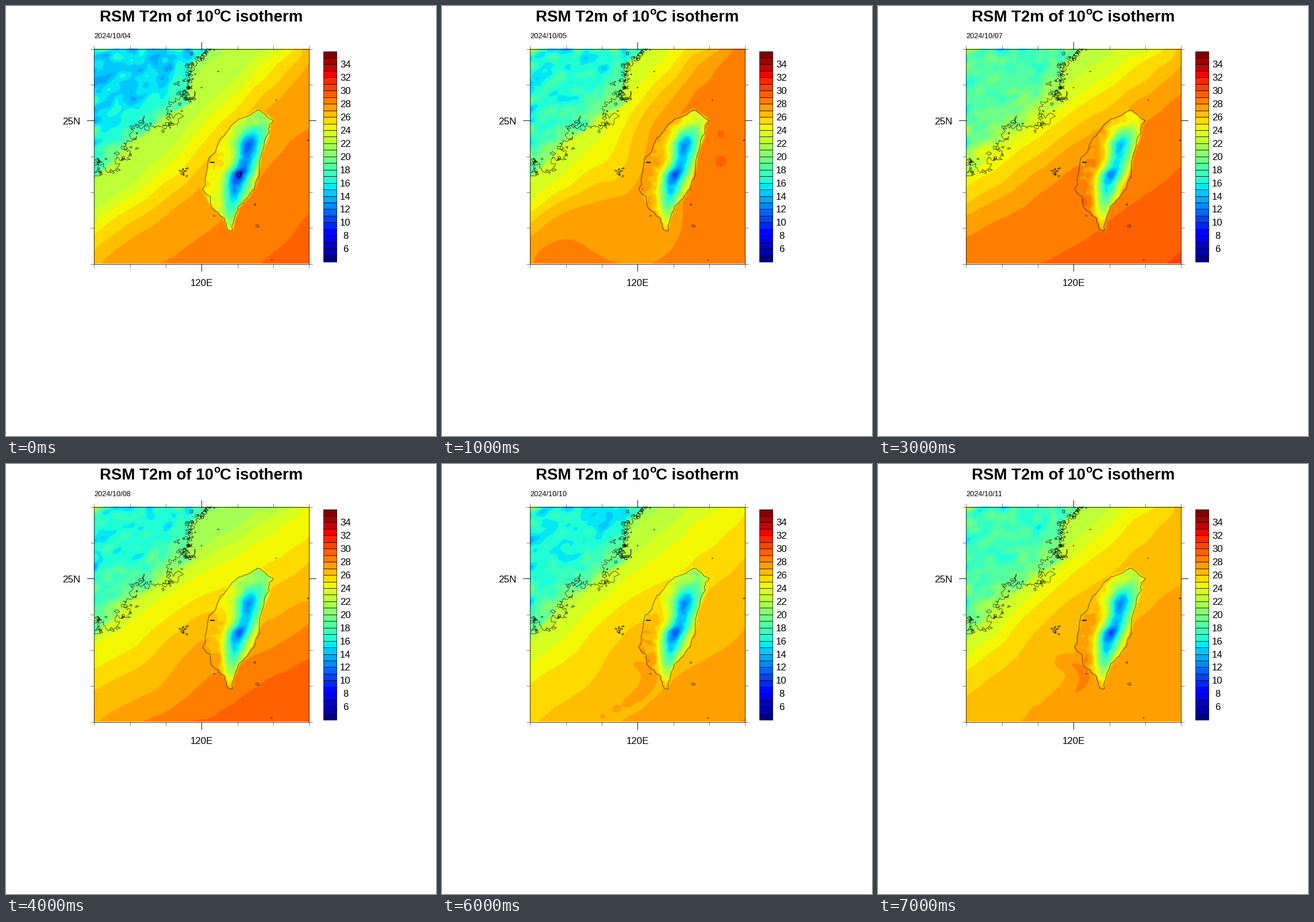
A matplotlib script for the animation above (8 s loop, 748 by 748 pixels).

```python
import numpy as np
import matplotlib.pyplot as plt
from matplotlib.animation import FuncAnimation
from matplotlib.path import Path
from matplotlib.patches import Rectangle

SIZE, DPI = 748, 100
PX = 72 / DPI
LEFT, RIGHT, TOP, BOTTOM = 153, 527, 74, 448
N_DAYS = 8
COLORS = plt.get_cmap("jet")(np.linspace(0, 1, 32))[:, :3]

X, Y = np.meshgrid(np.arange(LEFT, RIGHT) + 0.5, np.arange(TOP, BOTTOM) + 0.5)
rng = np.random.default_rng(11)


# ---------- field helpers ----------
def blur(a, along, across=None, angle=0.0):
    """Gaussian blur with two widths, turned by angle; edges are extended."""
    across = across or along
    pad = 40
    a = np.pad(a, pad, mode="edge")
    fy, fx = np.meshgrid(np.fft.fftfreq(a.shape[0]),
                         np.fft.fftfreq(a.shape[1]), indexing="ij")
    u = fx * np.cos(angle) + fy * np.sin(angle)
    v = fy * np.cos(angle) - fx * np.sin(angle)
    g = np.exp(-2 * np.pi ** 2 * ((u * along) ** 2 + (v * across) ** 2))
    return np.fft.ifft2(np.fft.fft2(a) * g).real[pad:-pad, pad:-pad]


def noise(along, across=None, angle=0.0):
    a = blur(rng.normal(size=X.shape), along, across, angle)
    return a / a.std()


def bump(x, y, r):
    return np.exp(-((X - x) ** 2 + (Y - y) ** 2) / (2 * r * r))


def inside(outline):
    grid = np.c_[X.ravel(), Y.ravel()]
    return Path(outline).contains_points(grid).reshape(X.shape).astype(float)


def rough(points, amp, depth):
    """Fractal coast by midpoint displacement."""
    p = np.array(points, float)
    for _ in range(depth):
        seg = np.diff(p, axis=0)
        shift = rng.normal(0, amp, (len(seg), 1))
        out = np.empty((2 * len(p) - 1, 2))
        out[::2] = p
        out[1::2] = p[:-1] + seg / 2 + seg[:, ::-1] * [1, -1] * shift
        p = out
    return p


def islet(x, y, r):
    t = np.linspace(0, 2 * np.pi, 9)
    rad = r * rng.uniform(0.3, 1.4, 9)
    rad[-1] = rad[0]
    return np.c_[x + rad * np.cos(t), y + 0.8 * rad * np.sin(t)]


# ---------- geography ----------
MAINLAND = [(358, 75), (337, 88), (320, 100), (320, 128), (313, 152),
            (322, 167), (280, 188), (248, 217), (210, 236), (190, 266),
            (153, 296)]
ISLAND = [(437, 181), (452, 190), (465, 199), (458, 207), (458, 220), (444, 258),
          (440, 285), (433, 313), (420, 334), (404, 349), (397, 370), (394, 391),
          (386, 390), (380, 369), (357, 349), (342, 319), (350, 283), (366, 248),
          (388, 214), (404, 197), (425, 190), (437, 181)]

island_mask = blur(inside(ISLAND), 1.8)
main_mask = blur(inside(MAINLAND + [(130, 310), (130, 50), (358, 50)]), 3)

# mountain ridge of the island: its course, height and width from north to south
ridge_y = [200, 222, 240, 262, 280, 293, 320, 350, 390]
ridge_x = np.interp(Y, ridge_y, [437, 428, 421, 419, 412, 404, 397, 392, 390])
ridge_h = np.interp(Y, ridge_y, [.2, .58, .9, .76, .8, 1, .74, .48, .05])
width = np.interp(Y, [190, 240, 320, 390], [26, 21, 18, 10])
width = np.where(X > ridge_x, 1.25, 1) * width
height = blur(ridge_h * np.exp(-((X - ridge_x) / width) ** 2), 3)
height = np.clip(height / height.max() + 0.02 * noise(3), 0, 1)

# positions across and along the strait
across = 0.75 * (X - 345) + 0.66 * (Y - 75)
along = -0.66 * (X - 345) + 0.75 * (Y - 75)
inland = (np.clip((30 - across) / 55, 0, 1) + np.clip((280 - Y) / 150, 0, 1)) / 2
terrain = noise(8, 4.5, -0.6)
ripple = noise(14)
lakes = sum(bump(x, y, 1.5) for x, y in [(339, 91), (319, 97), (211, 234)])


def weather(land, island, tilt, tongue, first, fronts, spots=()):
    """One day. land: coast, inland; island: north, west, southwest, summit;
    fronts: distance across the strait of each isotherm from `first` up;
    spots: x, y, radius, extra degrees."""
    s = across + tilt * along + 0.2 * np.maximum(along - 260, 0)
    s += tongue * bump(340, 310, 60) + 2 * ripple
    stops = [fronts[0] - 50, *fronts, fronts[-1] + 120]
    temp = np.interp(s, stops, first - 1 + np.arange(len(stops)))

    coast, deep = land
    main = coast + (deep - coast) * inland + 0.65 * terrain + 0.35 * noise(6)
    temp += (main - temp) * main_mask
    for x, y, r, extra in spots:
        temp += extra * bump(x, y, r)

    *low, summit = island
    low = np.interp(Y, [190, 270, 340], low) + 0.3 * noise(4)
    temp += (low - height * (low - summit) - temp) * island_mask
    return temp + (15.5 - temp) * np.minimum(lakes, 1)


# ---------- daily fields ----------
days = [None] * N_DAYS
days[0] = weather((21, 14.8), (23.8, 25.3, 24.6, 9.6), 0.05, -10,
                  23, [72, 90, 109, 130, 153, 222, 335])
days[1] = weather((22.4, 16.4), (27, 27.4, 27.4, 10.8), 0, -45,
                  24, [38, 58, 75, 95, 122, 420],
                  [(350, 385, 55, -0.9), (484, 222, 14, 0.8), (484, 270, 14, 0.8)])
days[3] = weather((25, 18.2), (27.6, 28.3, 29, 12.4), 0.22, 10,
                  23, [40, 68, 88, 115, 140, 177, 285])
days[4] = weather((22.8, 16.4), (22.8, 26.2, 28, 11.4), 0.28, 40,
                  22, [58, 80, 105, 150, 190, 240, 285, 330])
days[5] = weather((20.8, 14.6), (21.6, 25.3, 28, 11.3), 0.2, 50,
                  22, [45, 82, 138, 164, 248, 306, 400],
                  [(295, 88, 20, -2)])
hook = [((1 - t) ** 2 * 278 + 2 * t * (1 - t) * 420 + t * t * 318,
         (1 - t) ** 2 * 437 + 2 * t * (1 - t) * 365 + t * t * 342, 8, 0.7)
        for t in np.linspace(0, 1, 12)]
days[7] = weather((22.4, 17.6), (25, 27.5, 28, 10.8), 0.08, 35,
                  23, [40, 62, 86, 126, 220, 480], hook)
for gap in (2, 6):
    days[gap] = (days[gap - 1] + days[gap + 1]) / 2


def paint(temp):
    rgb = COLORS[np.clip(np.floor(temp) - 4, 0, 31).astype(int)]
    rgb[np.abs(temp - 10) < 0.2] = 0
    return rgb


pictures = [paint(t) for t in days]

# ---------- stage ----------
fig = plt.figure(figsize=(SIZE / DPI, SIZE / DPI), dpi=DPI, facecolor="white")
ax = fig.add_axes([0, 0, 1, 1])
image = ax.imshow(pictures[0], extent=(LEFT, RIGHT, BOTTOM, TOP),
                  interpolation="nearest", aspect="auto")
ax.set_xlim(0, SIZE)
ax.set_ylim(SIZE, 0)
ax.axis("off")


def line(pts, width=0.6):
    x, y = np.transpose(pts)
    return ax.plot(x, y, color="black", lw=width * PX)[0]


def label(x, y, text, size, ha="left", weight="normal"):
    return ax.text(x, y, text, fontsize=size * PX, ha=ha, va="baseline",
                   family="Liberation Sans", weight=weight)


# coasts, with islets scattered along the mainland and in one small group
frame = Rectangle((LEFT, TOP), RIGHT - LEFT, BOTTOM - TOP, fc="none", ec="none")
ax.add_patch(frame)
coast_line = rough(MAINLAND, 0.42, 5)
shores = [coast_line, rough(ISLAND, 0.07, 3), islet(297, 135, 5)]
for x, y in rng.choice(coast_line, 75):
    shores.append(islet(x + rng.normal(0, 6), y + rng.normal(0, 5),
                        rng.uniform(1, 4)))
for _ in range(9):
    shores.append(islet(rng.normal(312, 5), rng.normal(290, 6),
                        rng.uniform(0.8, 3)))
for x, y, r in [(433, 345, 2), (437, 383, 2.6), (462, 442, 0.9), (470, 164, 0.7),
                (525, 234, 1.4), (362, 365, 1), (369, 114, 0.9), (340, 142, 0.8)]:
    shores.append(islet(x, y, r))
for shore in shores:
    line(shore).set_clip_path(frame)
line([(356, 272), (362, 272)], 1.6)

# map border and ticks
x0, x1, y0, y1 = LEFT + 0.5, RIGHT + 0.5, TOP + 0.5, BOTTOM + 0.5
line([(x0, y0), (x1, y0), (x1, y1), (x0, y1), (x0, y0)], 0.8)
for k in range(7):
    x = x0 + (x1 - x0) * k / 6
    y = y0 + (y1 - y0) * k / 6
    nx, wx = (12, 0.9) if k == 3 else (6, 0.5)
    ny, wy = (12, 0.9) if k == 2 else (6, 0.5)
    line([(x, y0), (x, y0 - nx)], wx)
    line([(x, y1), (x, y1 + nx)], wx)
    line([(x0, y), (x0 - ny, y)], wy)
    line([(x1, y), (x1 + ny, y)], wy)
label(98.5, 206, "25N", 17)
label(340, 487, "120E", 16.7, ha="center")

# colour bar
BAR_X, BAR_BOTTOM, STEP = 552.4, 445.05, 366.5 / 32
for k, color in enumerate(COLORS):
    ax.add_patch(Rectangle((BAR_X, BAR_BOTTOM - (k + 1) * STEP), 22.4, STEP,
                           fc=color, ec="black", lw=0.7 * PX))
for value in range(6, 36, 2):
    label(590.5, BAR_BOTTOM - (value - 4) * STEP + 6, str(value), 16.7, ha="center")

# title and date
label(163, 27, "RSM T2m of 10", 27.6, weight="bold")
label(361.5, 14.5, "o", 18.5, weight="bold")
label(372.5, 27, "C isotherm", 27.6, weight="bold")
date = label(153, 56, "", 12.7)


def update(i):
    image.set_data(pictures[i])
    date.set_text(f"2024/10/{4 + i:02d}")
    return image, date


anim = FuncAnimation(fig, update, frames=N_DAYS, interval=1000,
                     repeat=True, repeat_delay=0, blit=False)
plt.show()
```
